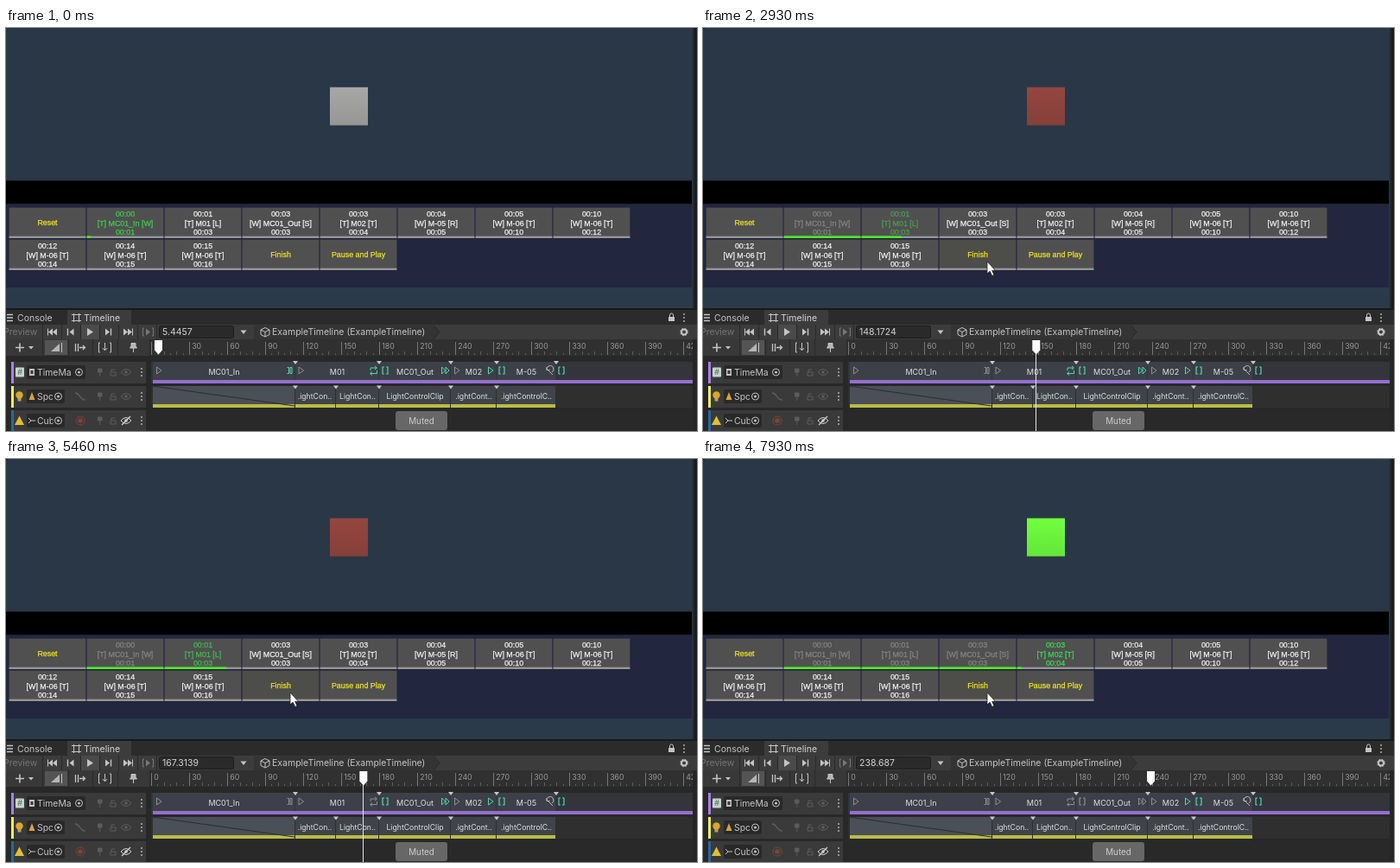
An HTML page for the animation above (8 s loop, 800 px wide and 466 px high).

```html
<!DOCTYPE html>
<html lang="en">
<head>
<meta charset="utf-8">
<title>Timeline</title>
<style>
html, body { margin: 0; width: 100%; height: 100%; overflow: hidden; background: #2a3746; }
svg { display: block; width: 100vw; height: 100vh; }
text { font-family: Inter, Roboto, sans-serif; white-space: pre; fill: currentColor; }
.cell text { font-family: "Liberation Sans", Arial, sans-serif; stroke: currentColor; stroke-width: .25px; }
</style>
</head>
<body>
<svg id="stage" viewBox="0 0 800 466">
  <defs>
    <linearGradient id="shade" x1="0" y1="0" x2="0" y2="1">
      <stop offset="0" stop-color="#000" stop-opacity="0"/>
      <stop offset="1" stop-color="#000" stop-opacity=".1"/>
    </linearGradient>
  </defs>
</svg>
<script>
const stage = document.getElementById('stage');
const LOOP = 8000, STEP = 200 / 3, SPEED = 0.06;
const TEAL = '#4fd6b4', SPENT = '#8b8e92', PALE = '#c4c4c4', DIM = '#5c5c5c';

function add(tag, attrs, parent = stage) {
  const el = document.createElementNS('http://www.w3.org/2000/svg', tag);
  for (const key in attrs) el.setAttribute(key, attrs[key]);
  return parent.appendChild(el);
}
const rect = (x, y, width, height, fill, parent, more) =>
  add('rect', { x, y, width, height, fill, ...more }, parent);
const path = (d, stroke, fill = 'none', width = 1, parent) =>
  add('path', { d, stroke, fill, 'stroke-width': width }, parent);
function label(str, x, y, size, color, anchor = 'start', parent) {
  const el = add('text', { x, y: y + size * 0.36, 'font-size': size, color, 'text-anchor': anchor }, parent);
  el.textContent = str;
  return el;
}
const frameX = f => 168.5 + 1.4663 * f;
const mix = (a, b, t) => `rgb(${a.map((v, i) => Math.round(v + (b[i] - v) * t))})`;

// Game view
rect(0, 0, 800, 325, '#2a3746');
rect(0, 300, 795, 24, '#2b3a4a');
rect(0, 176.5, 794, 27, '#000');
rect(0, 203.5, 794, 96.5, '#22263e');
rect(795, 0, 2, 325, '#22292f');
rect(797, 0, 3, 325, '#191b1e');
const corner = rect(0, 0, 2, 1, '#10151b');
const cube = rect(375, 68.5, 44, 44, '#a0a0a0');
rect(375, 68.5, 44, 44, 'url(#shade)');

// Cue buttons
const cues = [
  'Reset', '00:00|[T] MC01_In [W]|00:01', '00:01|[T] M01 [L]|00:03', '00:03|[W] MC01_Out [S]|00:03',
  '00:03|[T] M02 [T]|00:04', '00:04|[W] M-05 [R]|00:05', '00:05|[W] M-06 [T]|00:10',
  '00:10|[W] M-06 [T]|00:12', '00:12|[W] M-06 [T]|00:14', '00:14|[W] M-06 [T]|00:15',
  '00:15|[W] M-06 [T]|00:16', 'Finish', 'Pause and Play'
];
const cells = cues.map((cue, i) => {
  const x = 3.6 + (i % 8) * 90, y = i < 8 ? 207.7 : 244.7;
  const g = add('g', { class: 'cell' });
  const back = rect(x, y, 88.8, 35.2, '#505050', g);
  rect(x, y + 33, 88.8, 2.2, '#9a9a9a', g);
  const bar = rect(x, y + 32.8, 0, 2.4, '#48f01c', g);
  const lines = cue.split('|');
  const texts = lines.map((line, n) => label(line, x + 44.4,
    lines.length > 1 ? y + 7.2 + n * 10.4 : y + 17.5, 8.9,
    lines.length > 1 ? '#f2f2f2' : '#f0e41e', 'middle', g));
  return { back, bar, texts };
});
const finish = cells[11].back;

// Tabs
rect(0, 324, 800, 142, '#2b2b2b');
rect(0, 324, 800, 2, '#191919');
rect(71, 326, 74, 17, '#3c3c3c');
path('M1 331.5H8M1 335H8M1 338.5H8', PALE, 'none', 1.4);
label('Console', 13, 335, 10.5, PALE);
path('M78.500 330V340M84.500 330V340M76 331.500H87M76 338.500H87', PALE);
label('Timeline', 90, 335, 10.5, '#d4d4d4');
rect(767, 334, 7, 5, PALE);
path('M768.500 334V332a2 2 0 0 1 4 0V334', PALE);
const dots = (x, y) => [-4, 0, 4].forEach(d => rect(x - .8, y + d - .8, 1.6, 1.6, PALE));
dots(785, 335);

// Transport bar
rect(0, 343, 800, 17, '#3c3c3c');
rect(87, 343, 21, 17, '#4a4a4a');
label('Preview', -3, 351.5, 10.5, '#747474');
[42.5, 64.5, 86.5, 108.5, 130.5, 152.5, 174.5].forEach(x => path(`M${x} 343V360`, '#292929'));
const tri = (x, y, s, fill = PALE) => path(`M${x} ${y - 4}L${x + 5 * s} ${y}L${x} ${y + 4}Z`, 'none', fill);
path('M48.500 347.500V355.500', PALE); tri(54, 351.5, -1); tri(59, 351.5, -1);
path('M71.500 347.500V355.500', PALE, 'none', 1.4); tri(78.5, 351.5, -1);
path('M94 347L101 351.500L94 356Z', 'none', PALE);
tri(115, 351.5, 1); path('M121.500 347.500V355.500', PALE, 'none', 1.4);
tri(136, 351.5, 1); tri(141, 351.5, 1); path('M146.500 347.500V355.500', PALE);
path('M160 347H158.500V356H160M169 347H170.500V356H169', '#777'); tri(162, 351.5, 1, '#777');
rect(177.5, 344.5, 86, 14, '#2a2a2a', stage, { stroke: '#1c1c1c', rx: 2 });
const clock = label('', 181, 351.5, 10.5, '#d2d2d2');
path('M271.500 349.500H278.500L275 354Z', 'none', PALE);
path('M287 343.500H495L502 351.500L495 360H287Z', 'none', '#343434');
path('M495 343.500L502 351.500L495 360', '#282828');
path('M300 346.500L305 349V354.500L300 357L295 354.500V349ZM295 349L300 351.500L305 349M300 351.500V357', PALE);
label('ExampleTimeline (ExampleTimeline)', 308, 351.5, 10.5, PALE);
add('circle', { cx: 785, cy: 351.5, r: 3, fill: 'none', stroke: PALE, 'stroke-width': 2 });
add('circle', { cx: 785, cy: 351.5, r: 4.3, fill: 'none', stroke: PALE, 'stroke-width': 1, 'stroke-dasharray': '1.7 1.7' });

// Edit mode buttons and ruler
rect(0, 360, 166, 19, '#383838');
rect(45, 361, 26, 17, '#545454');
path('M11 369.500H21M16 364.500V374.500', PALE, 'none', 1.6);
path('M26 368H32L29 371.500Z', 'none', PALE);
path('M52 374L62 365V374Z', 'none', '#b5b5b5'); path('M64.500 364V375', PALE);
path('M80.500 365V374M83.500 365V374M85 369.500H91M89 367L91.500 369.500L89 372', PALE, 'none', 1.3);
path('M109 364H107.500V375H109M120 364H121.500V375H120M114.500 364V372M112 370L114.500 373L117 370', PALE);
path('M145 364.500H150V368L151.500 370H143.500L145 368ZM147.500 370V375', PALE, '#b5b5b5');
[42.5, 72.5, 100.5, 129.5].forEach(x => path(`M${x} 360V379`, '#2a2a2a'));
rect(167, 360, 628, 19, '#303030');
for (let f = 0; f < 427; f += 5) {
  const x = Math.floor(frameX(f)) + .5, major = f % 30 === 0;
  path(`M${x} ${major ? 363 : f % 10 ? 376 : 374}V378`, major ? '#777' : '#5d5d5d');
  if (major) label(f === 420 ? '42' : f, x + 2.7, 368, 8.8, '#989898');
}
rect(0, 379, 800, 87, '#282828');

// Track headers
const tracks = [[386, '#a680e6', 'TimeMa', 92], [414, '#eeee60', 'Spc', 68], [442, '#2a66a0', 'Cub', 68]];
tracks.forEach(([y, tint, name, right], i) => {
  const c = y + 12;
  rect(6, y, 3, 25, tint);
  rect(9, y, 153, 25, '#3a3a3a');
  rect(24, c - 8, right - 24, 16, '#292929', stage, { rx: 2 });
  label(name, 36, c, 10.4, PALE);
  if (right < 70) rect(54.5, c - 6, 2, 12, '#292929');
  const cx = right - 7.5;
  add('circle', { cx, cy: c, r: 4, fill: 'none', stroke: PALE });
  add('circle', { cx, cy: c, r: 1.5, fill: PALE });
  path(`M106.500 ${c - 4}H111V${c}H106.500ZM108.800 ${c}V${c + 5}`, DIM, DIM);
  path(`M121 ${c}H127V${c + 4}H121ZM122 ${c}V${c - 3}H126`, DIM);
  const eye = i === 2 ? '#d0d0d0' : DIM;
  path(`M133 ${c}Q139 ${c - 7} 145 ${c}Q139 ${c + 7} 133 ${c}Z`, eye);
  add('circle', { cx: 139, cy: c, r: 1.8, fill: eye });
  if (i === 2) path(`M134 ${c + 5}L144 ${c - 5}`, eye, 'none', 1.3);
  dots(157, c);
});
rect(11, 392.5, 10, 11, '#c9d3cd', stage, { rx: 1 });
label('#', 16, 398, 9, '#3c7a52', 'middle');
rect(27, 394, 6, 8, PALE); rect(28.5, 396, 3, 4, '#3b3b3b');
add('circle', { cx: 15.5, cy: 424.5, r: 4.2, fill: '#d9a82b' });
rect(13.5, 428, 4, 3.5, '#b9a060');
path('M30 421L33.500 430H26.500Z', 'none', '#d5a33a');
path('M80 422C86 422 85 430 92 430', '#606060', 'none', 1.3);
path('M15.500 448.500L21 459H10Z', 'none', '#dfbf36');
path('M26 451L29 454L26 457M29 454H34', PALE);
add('circle', { cx: 86, cy: 454, r: 5, fill: 'none', stroke: '#7c4436' });
add('circle', { cx: 86, cy: 454, r: 2.8, fill: '#7c4436' });

// Track lanes and clips
rect(168, 386, 627, 25, '#33353b');
rect(168, 414, 627, 25, '#2f2f2f');
rect(168, 442, 627, 24, '#292929');
const cuts = [170, 335, 432, 515, 568, 637];
['MC01_In', 'M01', 'MC01_Out', 'M02', 'M-05'].forEach((name, i) => {
  const x = cuts[i], w = cuts[i + 1] - x;
  rect(x, 386, w - 1, 21, '#3d4048');
  label(name, x + w / 2, 398, 9, '#e0e0e0', 'middle');
});
rect(170, 407, 625, 4, '#946fcf');
const lightCuts = [170, 335, 382, 432, 515, 568, 637];
['', '.ightCon..', 'LightCon..', 'LightControlClip', '.ightCont..', '.ightControlC..'].forEach((name, i) => {
  const x = lightCuts[i], w = lightCuts[i + 1] - x;
  rect(x, 414, w - 1, 21, i ? '#404349' : '#4b4f57');
  rect(x, 435, w - 1, 4, '#b9bd43');
  label(name, x + w / 2 - (i === 1 ? 1 : 0), 426, 8.7, '#dedede', 'middle');
});
path('M170 414L334 437', '#2a2d31');
const notch = (x, y) => path(`M${x - 3} ${y}H${x + 3}L${x} ${y + 4}Z`, 'none', '#c8c8c8');
cuts.slice(1).forEach(x => notch(x, 385));
lightCuts.slice(1, 6).forEach(x => notch(x, 413.5));
rect(451, 443, 60, 22, '#676767', stage, { rx: 3 });
label('Muted', 481, 454, 9.8, '#cdcdcd', 'middle');

// Clip behaviour icons, all centred on y 396
const play = (x, color) => path(`M${x - 2.5} 392L${x + 3} 396L${x - 2.5} 400Z`, color);
const hold = x => path(`M${x - 1} 392H${x - 3}V400H${x - 1}M${x + 1} 392H${x + 3}V400H${x + 1}`, TEAL, 'none', 1.2);
play(177, SPENT); play(341.5, SPENT); play(522, SPENT); play(561, TEAL);
hold(574); hold(643);
path('M626 395A4 4 0 1 1 632 398M626 392V395.500H629.500M628 396L633 401', '#b5bab9');
const icons = {
  inEnd: path('M325.500 392.500H327.500V399.500H325.500M329 392.500H331V399.500H329Z', TEAL),
  loop: path('M422 396V393H429M427 391L429.500 393L427 395M429.500 396V399.500H422M424 397.500L421.500 399.500L424 401.500', TEAL),
  outStart: hold(439),
  skip: path('M504.500 392L508.500 396L504.500 400ZM509 392L513 396L509 400Z', TEAL)
};

// Playhead and pointer
const line = rect(0, 377, 1, 89, '#e4e4e4');
const head = path('M-4.500 361H4.500V372.500L0 377.500L-4.500 372.500Z', 'none', '#fff');
rect(795, 360, 5, 106, '#262626');
const pointer = path('M329 270V284L332.200 281.200L334.700 286.500L337 285.400L334.600 280.400H338.500Z', '#222', '#fff', .8);

// Runs of playback: begins, time and frame on the run, frame where it holds
const runs = [
  [0, 0, 5.4457, 112],
  [2330, 44 * STEP, 148.1724, 180],
  [3463.8, 61 * STEP, 149.7071, 180],
  [4571.5, 82 * STEP, 167.3139, 180],
  [6955.2, 119 * STEP, 238.687, 999]
];
const spans = [[1, 0, 112], [2, 113.5, 180], [3, 180, 236.5], [4, 236.5, 272.4]];

function cubeColor(f) {
  if (f < 113.5) return mix([172, 172, 170], [61, 62, 59], f / 113.5);
  if (f < 146) return '#948c46';
  if (f < 180) return '#944640';
  return f < 236.5 ? '#3d6f98' : '#70ff3e';
}

function draw(t) {
  const [, at, value, stop] = runs.filter(run => run[0] <= t).pop();
  const f = Math.min(stop, value + SPEED * (t - at));
  const x = frameX(f), column = Math.floor(x);
  clock.textContent = +f.toFixed(4);
  head.setAttribute('transform', `translate(${x.toFixed(2)} 0)`);
  // The hairline drops out when it falls early in a pixel column
  line.setAttribute('x', column);
  line.setAttribute('visibility', x - column > .55 ? 'visible' : 'hidden');
  cube.setAttribute('fill', cubeColor(f));

  const glow = 0.5 + 0.5 * Math.cos((t - 6620) / 250);
  const live = spans.filter(span => f >= span[1]).pop()[0];
  for (const [i, from, to] of spans) {
    const { bar, texts } = cells[i];
    const done = i < live ? 1 : Math.max(0, Math.min(1, (f - from) / (to - from)));
    bar.setAttribute('width', 88.8 * done);
    const ink = i < live ? '#858585' : i > live ? '#f2f2f2' : mix([84, 132, 84], [44, 255, 76], glow);
    texts.forEach(el => el.setAttribute('color', ink));
  }

  const tint = (icon, spent) => icon.setAttribute('stroke', spent ? SPENT : TEAL);
  tint(icons.inEnd, t >= 2330);
  tint(icons.loop, t >= 5000);
  tint(icons.outStart, t >= 6955);
  tint(icons.skip, f >= 236.5);

  const hover = t >= 1860;
  finish.setAttribute('fill', hover ? '#4d4d49' : '#505050');
  pointer.setAttribute('visibility', hover ? 'visible' : 'hidden');
  corner.setAttribute('visibility', hover ? 'visible' : 'hidden');
}

const start = performance.now();
function tick() {
  const t = (performance.now() - start) % LOOP;
  draw(Math.min(119, Math.floor((t + 6.7) / STEP)) * STEP);
  requestAnimationFrame(tick);
}
tick();
</script>
</body>
</html>
```
